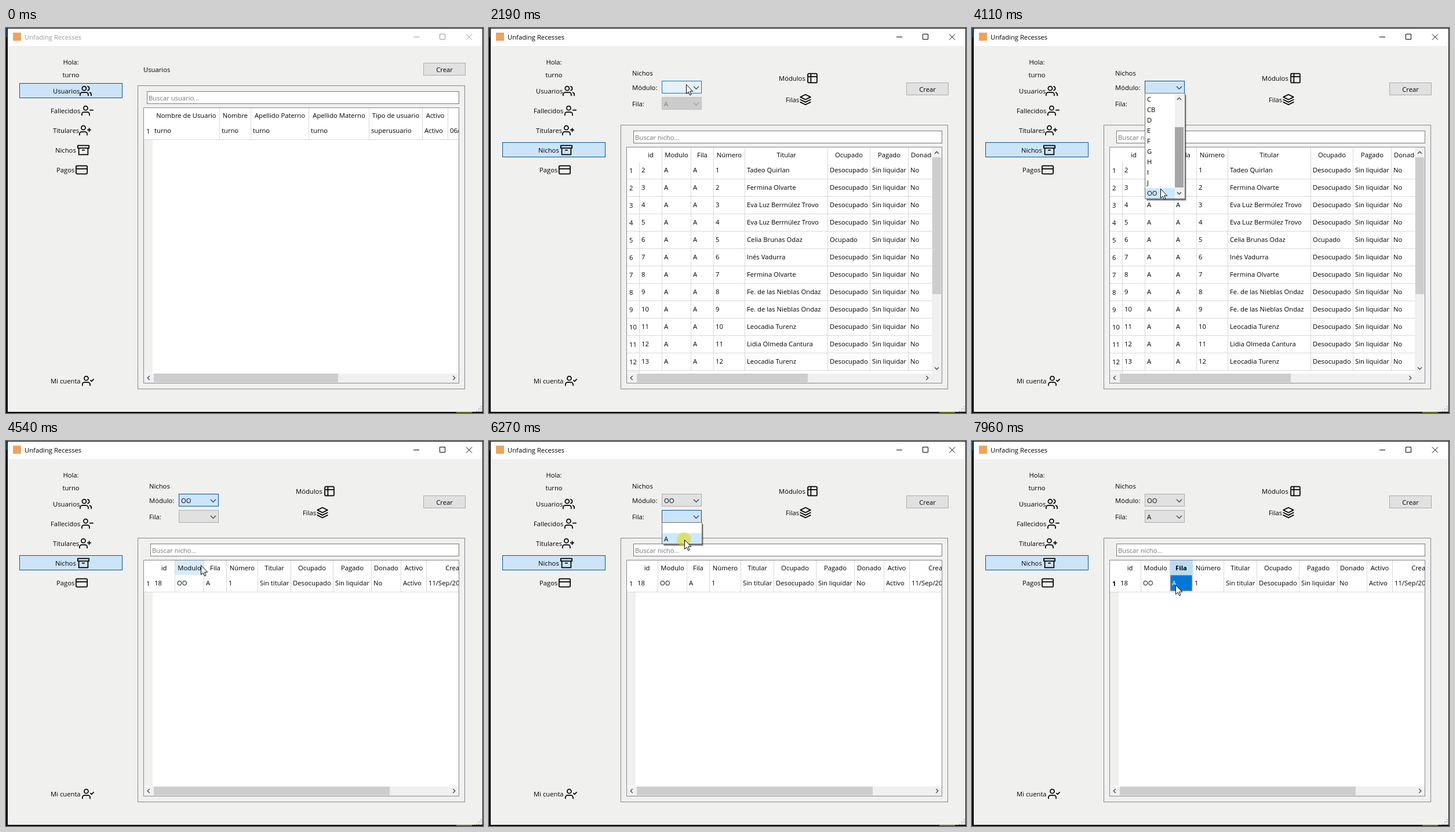
These frames come from a looping animation (823 by 664 pixels, 8 s). An HTML page:

```html
<!DOCTYPE html>
<html lang="es">
<head>
<meta charset="utf-8">
<title>Nichos</title>
<style>
html, body { margin: 0; width: 100%; height: 100%; overflow: hidden; background: #000; }
svg { display: block; }
text { font: 11.25px "Open Sans", "Noto Sans", sans-serif; fill: #000; white-space: pre; }
.hint { fill: #757575; }
.mid { text-anchor: middle; }
.bold { font-weight: 700; }
.icon { fill: none; stroke: #000; stroke-width: 2; stroke-linecap: round; stroke-linejoin: round; }
.thin { fill: none; stroke: #444; stroke-width: 1.3; }
.line { stroke: #d8d8d8; }
</style>
</head>
<body>
<svg id="stage" width="823" height="664" viewBox="0 0 823 664"></svg>
<script>
const BODY = '#f0f0ee', BLUE = '#cce4f7', NAVY = '#005499', HOVER = '#e5f1fb', GREY = '#e1e1e1';

// Drawing helpers: edges are inclusive pixels, text is placed by its vertical middle
const text = (x, y, s, cls = '', more = '') => `<text x="${x}" y="${y + 4}" class="${cls}" ${more}>${s}</text>`;
const fill = (x, y, w, h, c, more = '') => `<rect x="${x}" y="${y}" width="${w}" height="${h}" fill="${c}" ${more}/>`;
const box = (x, y, x2, y2, c, edge, more = '') =>
  `<rect x="${x + .5}" y="${y + .5}" width="${x2 - x}" height="${y2 - y}" fill="${c}" stroke="${edge}" ${more}/>`;
const path = (d, cls = 'thin', more = '') => `<path d="${d}" class="${cls}" ${more}/>`;
const group = (id, s) => `<g id="${id}">${s}</g>`;
const view = (x, y, w, h, s) => `<svg x="${x}" y="${y}" width="${w}" height="${h}" viewBox="${x} ${y} ${w} ${h}">${s}</svg>`;
const hline = (x, x2, y) => path(`M${x} ${y + .5}H${x2}`, 'line');
const vline = (x, y, y2) => path(`M${x + .5} ${y}V${y2}`, 'line');
const chevron = (x, y, r, dir = 'down', more = '') => {
  const turn = { down: 0, left: 90, up: 180, right: 270 }[dir];
  return path(`M${-r} ${-r / 2}L0 ${r / 2}L${r} ${-r / 2}`, 'thin', `transform="translate(${x} ${y}) rotate(${turn})" ${more}`);
};

const person = 'M16 21v-2a4 4 0 0 0-4-4H5a4 4 0 0 0-4 4v2M12.5 7a4 4 0 1 1-8 0a4 4 0 1 1 8 0';
const icons = {
  users: 'M17 21v-2a4 4 0 0 0-4-4H5a4 4 0 0 0-4 4v2M13 7a4 4 0 1 1-8 0a4 4 0 1 1 8 0M23 21v-2a4 4 0 0 0-3-3.87M16 3.13a4 4 0 0 1 0 7.75',
  minus: person + 'M23 11h-6',
  plus: person + 'M20 8v6M23 11h-6',
  check: person + 'M17 11l2 2 4-4',
  archive: 'M21 8v13H3V8M1 3h22v5H1zM10 12h4',
  card: 'M3 4h18a2 2 0 0 1 2 2v12a2 2 0 0 1-2 2H3a2 2 0 0 1-2-2V6a2 2 0 0 1 2-2zM1 10h22',
  table: 'M5 3h14a2 2 0 0 1 2 2v14a2 2 0 0 1-2 2H5a2 2 0 0 1-2-2V5a2 2 0 0 1 2-2zM9 3v18M3 9h18',
  layers: 'M12 2L2 7l10 5 10-5zM2 17l10 5 10-5M2 12l10 5 10-5'
};
const item = (x, y, label, ix, name) => text(x, y, label) +
  path(icons[name], 'icon', `transform="translate(${ix} ${y - 10.5}) scale(.875)"`);

const button = y => box(720, y, 792, y + 21, GREY, '#adadad') + text(756.5, y + 11.5, 'Crear', 'mid');
const search = (x, y, hint) => box(x, y, 781, y + 21, '#fff', '#7a7a7a') + text(x + 3, y + 11.5, hint, 'hint');

// heads: [left, right, title]; rows: arrays of cell texts
function grid(top, left, right, heads, rows, pad) {
  const last = top + 25 + (rows.length === 1 ? 29 : 30 * rows.length);
  const end = Math.min(last, 595);
  let s = fill(238, end, left - 238, 596 - end, BODY);
  heads.forEach(([a, b, title], i) => {
    if (i) s += vline(a, top, end);
    s += text((a + b + 1) / 2, top + 13, title, 'mid');
  });
  rows.forEach((cells, r) => {
    const y = top + 39 + 30 * r;
    s += hline(238, right, y + 15) + text(242, y + .5, r + 1, '', 'data-row');
    cells.forEach((c, i) => s += text(heads[i][0] + (i ? 4 : pad), y, c));
  });
  return s;
}
const table = (top, right, body) => box(237, top, 781, 612, '#fff', '#828790') +
  view(238, top + 1, right - 238, 594 - top, body);
const scrollX = (end, arrow) => fill(238, 596, 543, 16, '#f0f0f0') + fill(255, 596, end - 255, 15, '#cdcdcd') +
  chevron(246, 603.5, 3.5, 'left') + chevron(arrow, 603.5, 3.5, 'right');

const userHeads = [[253, 368, 'Nombre de Usuario'], [368, 422, 'Nombre'], [422, 522, 'Apellido Paterno'],
  [522, 626, 'Apellido Materno'], [626, 718, 'Tipo de usuario'], [718, 762, 'Activo'], [762, 870, '']];
const userRow = ['turno', 'turno', 'turno', 'turno', 'superusuario', 'Activo', '06/Sep/2023'];

const holders = ['Tadeo Quirlan', 'Fermina Olvarte', 'Eva Luz Bermúlez Trovo', 'Eva Luz Bermúlez Trovo', 'Celia Brunas Odaz',
  'Inés Vadurra', 'Fermina Olvarte', 'Fe. de las Nieblas Ondaz', 'Fe. de las Nieblas Ondaz', 'Leocadia Turenz',
  'Lidia Olmeda Cantura', 'Leocadia Turenz'];
const allHeads = [[259, 298, 'id'], [298, 348, 'Modulo'], [348, 387, 'Fila'], [387, 441, 'Número'], [441, 584, 'Titular'],
  [584, 657, 'Ocupado'], [657, 723, 'Pagado'], [723, 774, 'Donado']];
const allRows = holders.map((name, i) =>
  [i + 2, 'A', 'A', i + 1, name, i === 4 ? 'Ocupado' : 'Desocupado', 'Sin liquidar', 'No']);
const oneHeads = [[253, 291, 'id'], [291, 341, 'Modulo'], [341, 380, 'Fila'], [380, 434, 'Número'], [434, 491, 'Titular'],
  [491, 564, 'Ocupado'], [564, 630, 'Pagado'], [630, 681, 'Donado'], [681, 725, 'Activo'], [725, 828, 'Creado']];
const oneRow = [18, 'OO', 'A', 1, 'Sin titular', 'Desocupado', 'Sin liquidar', 'No', 'Activo', '11/Sep/2023'];

const combo = (id, y) => box(298, y, 366, y + 21, GREY, '#adadad', `id="${id}"`) +
  text(302, y + 11.5, '', '', `id="${id}Text"`) + chevron(357.5, y + 12, 4.5, 'down', `id="${id}Arrow"`);
const popup = (y, h) => fill(302, y + 4, 68, h, '#000', 'opacity=".22"') + fill(301, y + 3, 68, h, '#000', 'opacity=".4"') +
  box(298, y, 367, y + h, '#fff', '#707070');

const modules = ['', 'DSC', 'A', 'B', 'C', 'CB', 'D', 'E', 'F', 'G', 'H', 'I', 'J', 'OO'];

let grip = '';
for (let i = 0; i < 3; i++) for (let j = 2 - i; j < 3; j++) grip += fill(811 + 4 * j, 652 + 4 * i, 2, 2, '#b8b8b8');

document.getElementById('stage').innerHTML =
  fill(0, 0, 823, 664, '#0c0c0e') + fill(0, 0, 2, 16, '#14427e') + fill(777, 662, 27, 2, '#5d6a1c') +
  fill(3, 1, 819, 30, '#fff') + fill(3, 31, 819, 631, BODY) + grip +
  fill(12, 8, 14, 14, '#eda45f') +
  text(32, 15.5, 'Unfading Recesses', '', 'id="title"') +
  `<g id="sys" fill="none">${path('M703 15.5H713M748.5 10.5h9v9h-9zM794 10.5l10 10M804 10.5l-10 10', '')}</g>` +
  text(112, 58.5, 'Hola:', 'mid') + text(112, 80.5, 'turno', 'mid') +
  box(23, 95, 200, 120, BLUE, NAVY, 'id="pickUsers"') + box(23, 197, 200, 222, BLUE, NAVY, 'id="pickNiches"') +
  item(81, 108.5, 'Usuarios', 127, 'users') + item(77, 142.5, 'Fallecidos', 130, 'minus') +
  item(81, 176.5, 'Titulares', 126, 'plus') + item(85, 210.5, 'Nichos', 123, 'archive') +
  item(87, 244.5, 'Pagos', 120, 'card') + item(77, 608.5, 'Mi cuenta', 131, 'check') +

  group('users', text(237, 72, 'Usuarios') + button(60) + box(227, 99, 791, 622, 'none', '#828790') +
    search(243, 109, 'Buscar usuario...') + table(137, 781, grid(138, 253, 781, userHeads, [userRow], 3)) + scrollX(573, 773)) +

  group('niches', text(247, 77.5, 'Nichos') + text(247, 103, 'Módulo:') + text(247, 131, 'Fila:') +
    combo('mod', 91) + combo('row', 119) +
    item(500, 86.5, 'Módulos', 547.5, 'table') + item(512, 123.5, 'Filas', 535.5, 'layers') +
    button(94) + box(227, 167, 791, 622, 'none', '#828790') + search(249, 177, 'Buscar nicho...') +
    group('all', table(205, 764, vline(259, 231, 595) + grid(206, 259, 764, allHeads, allRows, 4)) + scrollX(550, 756) +
      fill(764, 206, 17, 390, '#f0f0f0') + fill(765, 223, 15, 236, '#cdcdcd') +
      chevron(772.5, 215, 3.5, 'up') + chevron(772.5, 587, 3.5)) +
    group('one', table(205, 781, fill(291, 206, 51, 25, '#d9ebf9', 'id="headHover"') +
      grid(206, 253, 781, oneHeads, [oneRow], 3)) + scrollX(662, 773)) +
    group('cell', fill(342, 206, 39, 25, '#bcdcf4') + text(361, 219, 'Fila', 'mid bold') +
      fill(239, 236, 12, 18, '#fff') + text(242, 245.5, '1', 'bold') +
      box(342, 231, 379, 258, '#0078d7', '#e07020', 'stroke-dasharray="1 1"') + text(345, 245, 'A', '', 'style="fill:#fff"'))) +

  group('modList', popup(112, 182) +
    view(299, 114, 51, 180, fill(299, 114, 51, 18, '#cce8ff', 'id="modMark"') +
      group('modItems', modules.map((m, i) => text(302, 123 + 18 * i, m)).join(''))) +
    fill(350, 114, 17, 180, '#f0f0f0') + fill(350, 130, 15, 104, '#a6a6a6', 'id="thumb"') +
    chevron(357.5, 122, 3.5, 'up') + chevron(357.5, 285, 3.5)) +
  group('rowList', popup(140, 37) + fill(299, 159, 68, 18, '#cce8ff', 'id="rowMark"') + text(302, 168.5, 'A')) +

  group('mouse', '<circle id="glow" cx="-.5" cy="-.5" r="12" fill="#e4dc14" opacity=".62"/>' +
    '<path d="M.5.5v16l3.6-3.4 2.5 5.7 2.4-1-2.4-5.6h5.1z" fill="#fff" stroke="#000"/>');

const $ = id => document.getElementById(id);
const show = (id, on) => $(id).style.display = on ? '' : 'none';
const within = (t, a, b) => t >= a && t < b;
const paint = (id, c, edge) => { $(id).setAttribute('fill', c); $(id).setAttribute('stroke', edge); };
const looks = { idle: [GREY, '#adadad'], hover: [HOVER, '#0078d7'], down: [BLUE, NAVY], off: ['#cccccc', '#bfbfbf'] };

// Mouse path: time, x, y
const keys = [[70, 678, 615], [770, 97, 200], [830, 97, 200], [970, 90, 209], [1560, 90, 209], [2190, 340, 97],
  [2930, 340, 97], [3350, 360, 148], [3420, 360, 148], [3760, 361, 185], [3830, 361, 185], [4110, 325, 277],
  [4539, 325, 277], [4540, 336, 214], [5310, 350, 130], [5450, 347, 130], [5990, 337, 170], [6340, 337, 170],
  [7040, 422, 74], [7530, 351, 248], [8000, 351, 248]];

function mouseAt(t) {
  let i = 0;
  while (i < keys.length - 2 && t >= keys[i + 1][0]) i++;
  const [t0, x0, y0] = keys[i], [t1, x1, y1] = keys[i + 1];
  const p = Math.max(0, Math.floor((t - t0) / 70) * 70 / (t1 - t0)), e = p * p * (3 - 2 * p);
  return [Math.round(x0 + (x1 - x0) * e), Math.round(y0 + (y1 - y0) * e)];
}

function draw(t) {
  const [mx, my] = mouseAt(t);
  show('mouse', t >= 70);
  $('mouse').setAttribute('transform', `translate(${mx} ${my})`);
  show('glow', [[2590, 2720], [3350, 3830], [4250, 4390], [5380, 5520], [6270, 6410]].some(([a, b]) => within(t, a, b)));

  const active = t >= 1170;
  $('title').style.fill = active ? '#000' : '#999';
  $('sys').setAttribute('stroke', active ? '#000' : '#999');
  show('pickUsers', t < 1560);
  show('pickNiches', active);
  show('users', t < 1560);
  show('niches', t >= 1560);

  paint('mod', ...looks[within(t, 2050, 2590) ? 'hover' : within(t, 2590, 5450) ? 'down' : 'idle']);
  $('modText').textContent = t >= 4540 ? 'OO' : '';
  const off = t < 4540;
  paint('row', ...looks[off ? 'off' : within(t, 5240, 6130) ? 'hover' : within(t, 6130, 6550) ? 'down' : 'idle']);
  $('rowText').textContent = off || t >= 6410 ? 'A' : '';
  $('rowText').style.fill = off ? '#838383' : '#000';
  $('rowArrow').style.stroke = off ? '#a0a0a0' : '#444';

  show('all', off);
  show('one', !off);
  show('headHover', within(t, 4540, 4750));
  show('cell', t >= 7960);

  show('modList', within(t, 2660, 4390));
  const drag = t < 3420 ? 0 : t < 3760 ? Math.min(1, (my - 148) / 37) : 1;
  const first = Math.round(drag * 4);
  const mark = t < 3830 ? -first : Math.min(9, Math.floor((my - 114) / 18));
  $('thumb').setAttribute('y', 130 + Math.round(41 * drag));
  $('modItems').setAttribute('transform', `translate(0 ${-18 * first})`);
  $('modMark').setAttribute('y', 114 + 18 * mark);

  show('rowList', within(t, 5450, 6410));
  $('rowMark').setAttribute('y', my >= 159 ? 159 : 141);
}

function tick() {
  draw(performance.now() % 8000);
  requestAnimationFrame(tick);
}
tick();
</script>
</body>
</html>
```
